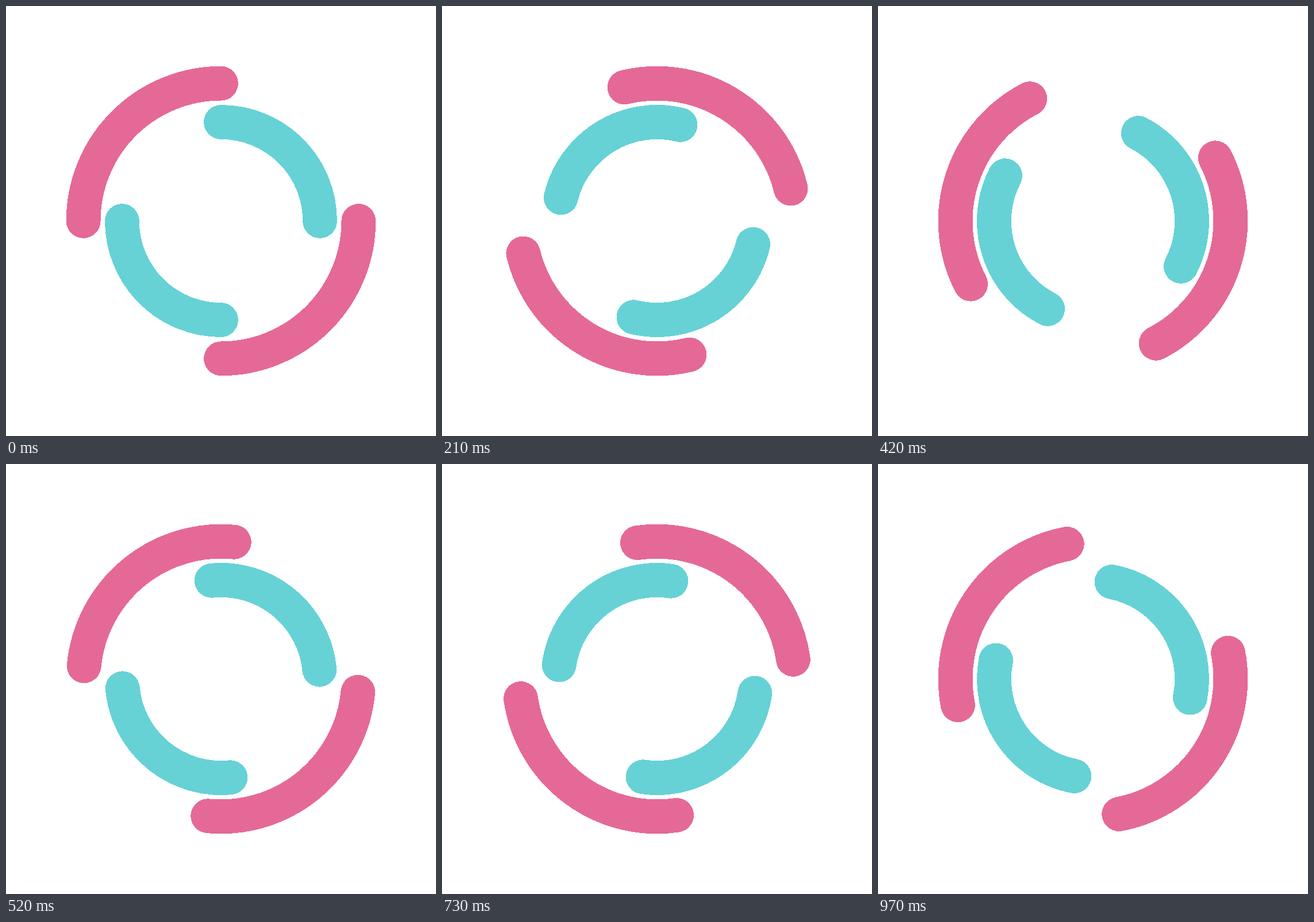
These frames come from a looping animation (748x748 px, 1 s). An HTML page:

```html
<!DOCTYPE html>
<html lang="en">
<head>
<meta charset="utf-8">
<title>Double ring spinner</title>
<style>
  html, body { margin: 0; width: 100%; height: 100%; overflow: hidden; background: #fff; }
  svg { display: block; width: 100%; height: 100%; }
  path { fill: none; stroke-width: 8; stroke-linecap: round; }
</style>
</head>
<body>
<svg viewBox="-50 -50 100 100" shape-rendering="crispEdges">
  <path id="outer" stroke="#e56997" d="M-32 0A32 32 0 0 1 0-32M32 0A32 32 0 0 1 0 32"/>
  <path id="inner" stroke="#66d2d6" d="M0-23A23 23 0 0 1 23 0M0 23A23 23 0 0 1-23 0"/>
</svg>
<script>
  const outer = document.getElementById('outer');
  const inner = document.getElementById('inner');
  const STEPS = 33;

  // Steps last 30 ms each, except the middle one (16), which lasts 40 ms.
  const stepAt = t => t < 520 ? Math.min(16, Math.floor(t / 30)) : Math.floor((t - 10) / 30);

  const turn = (el, deg) => el.setAttribute('transform', `rotate(${deg})`);

  const start = performance.now();
  function draw(now) {
    const angle = stepAt(Math.max(0, now - start) % 1000) * 360 / STEPS;
    turn(outer, angle);
    turn(inner, -angle);
    requestAnimationFrame(draw);
  }
  draw(start);
</script>
</body>
</html>
```
